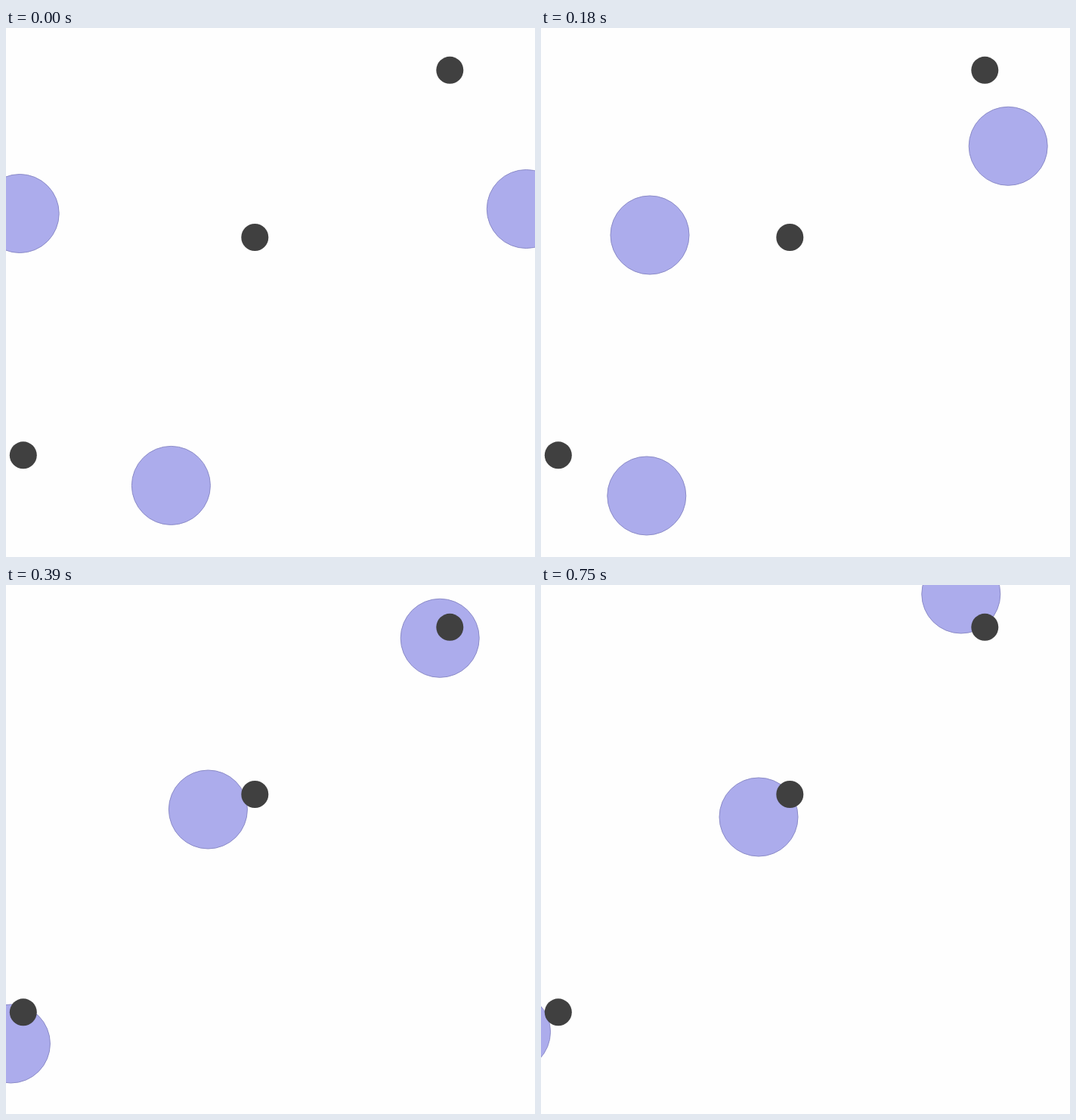
Write an HTML page with a canvas that moves like this. It is 700x700 px and loops after 0.78 s.

```html
<!DOCTYPE html>
<html lang="en">
<head>
<meta charset="utf-8">
<title>Drifting discs</title>
<style>
  html, body { margin: 0; width: 100%; height: 100%; overflow: hidden; background: #fff; }
  canvas { display: block; }
</style>
</head>
<body>
<canvas id="stage" width="700" height="700"></canvas>
<script>
const ctx = document.getElementById('stage').getContext('2d');
const LOOP = 780, STEP = 30;

// Waypoints of each disc: [ms, x, y]
const paths = [
  [[0, 18.2, 245.5], [120, 90.4, 262.2], [180, 144, 274], [270, 216, 290.6],
   [390, 267.4, 297], [510, 284, 301], [750, 288, 307]],
  [[0, 688.3, 239.5], [120, 640.8, 189.6], [180, 618.2, 156.3], [270, 594, 112],
   [390, 574.2, 70.3], [510, 563.2, 45], [750, 555.8, 12]],
  [[0, 218.4, 605.4], [120, 180.3, 612.6], [180, 139.8, 619], [225, 106.2, 620.7],
   [270, 72.7, 618], [390, 6.4, 607], [510, -24, 598], [750, -39.5, 591.3]]
];
const dots = [[587.3, 55.8], [329.3, 277], [22.8, 565.3]];

const slope = (p, i, axis) => (p[i + 1][axis] - p[i][axis]) / (p[i + 1][0] - p[i][0]);

// Velocity at waypoint i: weighted geometric mean of the neighbouring slopes
function velocity(p, i, axis) {
  const last = p.length - 1;
  if (i === 0) return (3 * slope(p, 0, axis) - velocity(p, 1, axis)) / 2;
  if (i === last) return (3 * slope(p, last - 1, axis) - velocity(p, last - 1, axis)) / 2;
  const before = slope(p, i - 1, axis), after = slope(p, i, axis);
  const w = (p[i + 1][0] - p[i][0]) / (p[i + 1][0] - p[i - 1][0]);
  if (before * after <= 0) return before * w + after * (1 - w);
  const a = Math.abs(before), b = Math.abs(after);
  return Math.sign(after) * Math.min(a ** w * b ** (1 - w), 3 * a, 3 * b);
}

// Cubic Hermite interpolation along one axis
function position(p, t, axis) {
  let i = 0;
  while (i < p.length - 2 && t >= p[i + 1][0]) i++;
  const span = p[i + 1][0] - p[i][0], u = (t - p[i][0]) / span;
  const ease = u * u * (3 - 2 * u);
  return p[i][axis] + (p[i + 1][axis] - p[i][axis]) * ease
    + span * u * (1 - u) * ((1 - u) * velocity(p, i, axis) - u * velocity(p, i + 1, axis));
}

function circle(x, y, r, fill, stroke) {
  ctx.beginPath();
  ctx.arc(x, y, r, 0, 2 * Math.PI);
  ctx.fillStyle = fill;
  ctx.fill();
  if (stroke) {
    ctx.strokeStyle = stroke;
    ctx.stroke();
  }
}

function draw() {
  const t = Math.floor(performance.now() % LOOP / STEP) * STEP;
  ctx.fillStyle = '#fefefe';
  ctx.fillRect(0, 0, 700, 700);
  for (const p of paths) circle(position(p, t, 1), position(p, t, 2), 52, '#acacec', '#8c8cc8');
  for (const [x, y] of dots) circle(x, y, 18, '#404040');
  requestAnimationFrame(draw);
}
draw();
</script>
</body>
</html>
```
